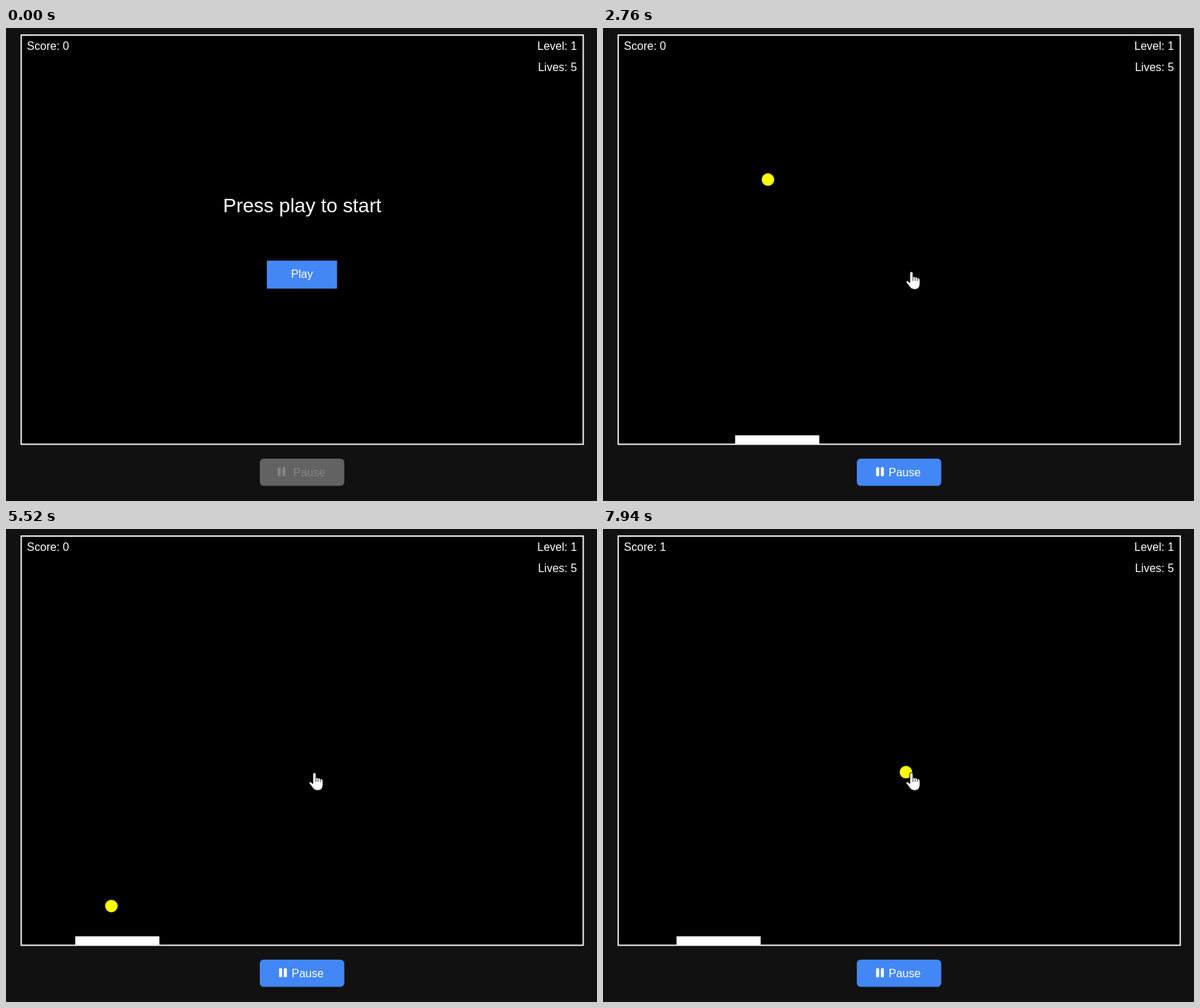
Write an HTML page that moves like this. It is 836 by 670 pixels and loops after 8000 ms.

```html
<!DOCTYPE html>
<html lang="en">
<head>
<meta charset="utf-8">
<title>Paddle game</title>
<style>
  html, body { margin: 0; width: 100%; height: 100%; overflow: hidden; background: #111; }
  svg { display: block; width: 836px; height: 670px; }
  text { font: 16px "Liberation Sans", Arial, sans-serif; fill: #fff; }
  .title { font-size: 28px; }
  .mid { text-anchor: middle; }
  .end { text-anchor: end; }
</style>
</head>
<body>
<svg viewBox="0 0 836 670">
  <rect width="836" height="670" fill="#111"/>
  <rect x="21.5" y="10" width="795" height="579.6" fill="#000" stroke="#fff" stroke-width="1.8"/>
  <text id="score" x="29.6" y="30.7"></text>
  <text class="end" x="807.6" y="30.7">Level: 1</text>
  <text class="end" x="807.6" y="60.7">Lives: 5</text>

  <g id="menu">
    <text class="title mid" x="419" y="260.6">Press play to start</text>
    <rect x="369" y="329.5" width="99.3" height="39.7" fill="#4287f5"/>
    <text class="mid" x="418.7" y="354">Play</text>
  </g>

  <g id="game">
    <circle id="ball" r="8.9" fill="#ff0"/>
    <rect id="paddle" y="577" width="119" height="12" fill="#fff"/>
  </g>

  <g id="pause">
    <rect id="pauseBg" x="359" y="610" width="119.5" height="38.5" rx="5.5"/>
    <g id="bars" fill="#fff">
      <rect x="386.3" y="622.3" width="4.3" height="12.6" rx="1.1"/>
      <rect x="393" y="622.3" width="4.3" height="12.6" rx="1.1"/>
    </g>
    <text id="pauseText" y="634.5">Pause</text>
  </g>

  <circle id="click" cx="436" cy="344" r="15" fill="#ff0" fill-opacity=".47"/>
  <g id="cursor" stroke="#000" stroke-width="1">
    <path id="arrow" fill="#fff" d="M0 0V17L4 13.2L6.7 19.3L9.2 18.2L6.6 12.3H12Z"/>
    <g id="hand">
      <path fill="#fff" d="M-2 3Q-2 .6 .2 .6T2.4 3V8Q3.6 7 5.4 8.6Q7 7.8 8.6 9.5Q12.3 9 12.3 12.5V18Q12.3 26 4.5 26Q.5 26-2 22.5L-7 16Q-8 13.5-5.4 13.5L-2 16.3Z"/>
      <path fill="none" stroke-width=".8" d="M2.4 8V14M5.4 9V14M8.6 10V14"/>
    </g>
  </g>
</svg>
<script>
const LOOP = 8000, START = 1190, SPEED = 7.985;
const WALL = 31.5, FLOOR = 579;
const $ = id => document.getElementById(id);
const show = (id, on) => $(id).setAttribute('display', on ? 'inline' : 'none');
const set = (id, attrs) => {
  for (const k in attrs) $(id).setAttribute(k, attrs[k]);
};
const lerp = (a, b, p) => a + (b - a) * p;

// Piecewise linear value through [position, value] points.
function along(points, p) {
  if (p <= points[0][0]) return points[0][1];
  for (let i = 1; i < points.length; i++) {
    const [a, x] = points[i - 1], [b, y] = points[i];
    if (p <= b) return lerp(x, y, (p - a) / (b - a));
  }
  return points[points.length - 1][1];
}

// Time in ms to game tick, and tick to paddle position.
const TICKS = [[1190, 0], [2030, 12], [2830, 24], [7940, 98]];
const PADDLE = [
  [14, 359], [21.2, 187], [28, 187], [33, 68], [44, 68], [46, 22.5],
  [54, 22.5], [56, 68], [61, 68], [62.25, 98], [64, 98], [64.25, 104]
];

function drawCursor(t) {
  const step = Math.min(8, Math.floor((t - 120) / 66.25 + 0.3));
  show('cursor', t >= 120);
  const p = 1 - (1 - step / 8) ** 2;
  const x = lerp(734, 436, p), y = lerp(650, 344.4, p);
  const over = x > 369 && x < 468 && y > 329 && y < 369;
  show('hand', over);
  show('arrow', !over);
  set('cursor', { transform: `translate(${x} ${y})` });
  show('click', t >= 1000 && t < START);
}

function drawPause(playing, tick) {
  const p = playing ? 1 - (1 - Math.min(1, tick / 4)) ** 2 : 0;
  const from = [153, 153, 153], to = [66, 135, 245];
  const rgb = from.map((c, i) => Math.round(lerp(c, to[i], p)));
  set('pauseBg', { fill: `rgb(${rgb})` });
  set('pause', { opacity: playing ? 1 : 0.6 });
  set('bars', { transform: `translate(${playing ? 0 : -2} 0)`, opacity: playing ? 1 : 0.55 });
  set('pauseText', { x: playing ? 404 : 406.3, opacity: playing ? 1 : 0.55 });
}

function draw(t) {
  const playing = t >= START;
  const tick = Math.floor(along(TICKS, t) + 0.3);
  show('menu', !playing);
  show('game', playing);
  const d = SPEED * (Math.max(0.2, tick) - 1);
  set('ball', {
    cx: WALL + Math.abs(409 - WALL - d),
    cy: FLOOR - Math.abs(FLOOR - 39 - d)
  });
  set('paddle', { x: along(PADDLE, tick) });
  $('score').textContent = 'Score: ' + (tick >= 69 ? 1 : 0);
  drawPause(playing, tick);
  drawCursor(t);
}

const begin = performance.now();
function frame(now) {
  draw(Math.max(0, now - begin) % LOOP);
  requestAnimationFrame(frame);
}
draw(0);
requestAnimationFrame(frame);
</script>
</body>
</html>
```
